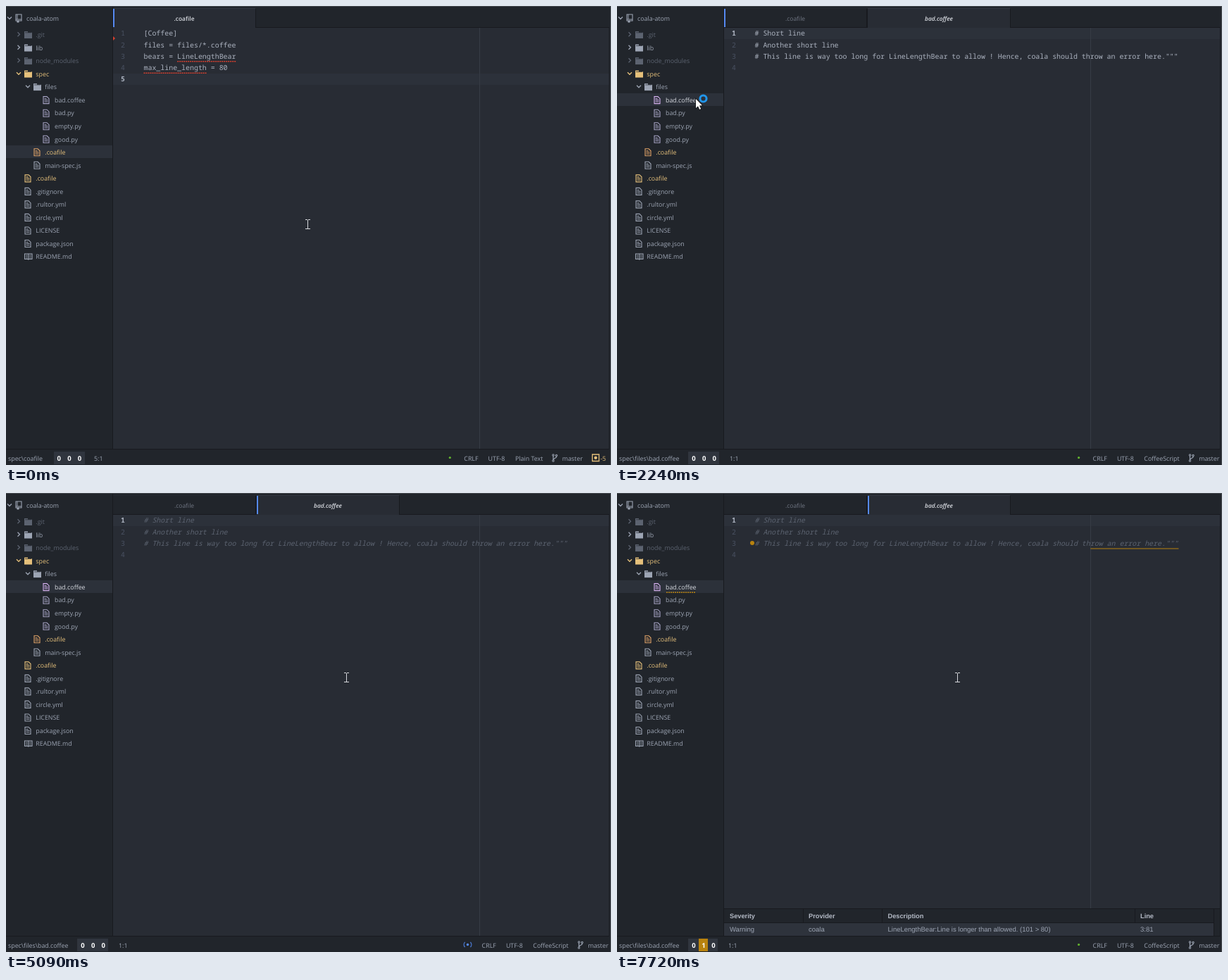
These frames come from a looping animation (859 by 652 pixels, 8000 ms). An HTML page with a canvas:

```html
<!DOCTYPE html>
<html lang="en">
<head>
<meta charset="utf-8">
<title>Editor linting a file</title>
<style>
  html, body { margin: 0; width: 100%; height: 100%; overflow: hidden; background: #282c34; }
  canvas { display: block; }
</style>
</head>
<body>
<canvas id="stage" width="859" height="652"></canvas>
<script>
const ctx = document.getElementById('stage').getContext('2d');
ctx.textRendering = 'geometricPrecision';

const LOOP = 8000;
const T = { select: 1890, busy: 1945, open: 2240, focus: 2330, grammar: 2420, spin: 2540, result: 7620, done: 7700 };
const C = {
  side: '#21252b', editor: '#282c34', line: '#2c313a', border: '#181a1f', edge: '#484c52',
  text: '#9da5b4', code: '#abb2bf', dim: '#5c6370', faint: '#495162', bright: '#d7dae0',
  yellow: '#e5c07b', orange: '#e0a368', violet: '#a6a3c4', pink: '#d5b0ee',
  blue: '#568af2', red: '#d8402f', warn: '#b8820e', green: '#65b82e'
};
const UI = '8.85px "Open Sans", sans-serif';
const MONO = '9.933px "Noto Sans Mono", monospace';
const COL = 5.96, CODE_X = 195.5;

const TREE = [
  // name, level, kind, colour
  ['.git', 0, 'closed', C.dim],
  ['lib', 0, 'closed', C.text],
  ['node_modules', 0, 'closed', C.dim],
  ['spec', 0, 'opened', C.yellow],
  ['files', 1, 'opened', C.text],
  ['bad.coffee', 2, 'file', C.text, C.violet],
  ['bad.py', 2, 'file', C.text, C.violet],
  ['empty.py', 2, 'file', C.text, C.violet],
  ['good.py', 2, 'file', C.text, C.violet],
  ['.coafile', 1, 'file', C.yellow, C.orange],
  ['main-spec.js', 1, 'file', C.text],
  ['.coafile', 0, 'file', C.yellow],
  ['.gitignore', 0, 'file', C.text],
  ['.rultor.yml', 0, 'file', C.text],
  ['circle.yml', 0, 'file', C.text],
  ['LICENSE', 0, 'file', C.text],
  ['package.json', 0, 'file', C.text],
  ['README.md', 0, 'book', C.text]
];
const CONFIG = ['[Coffee]', 'files = files/*.coffee', 'bears = LineLengthBear', 'max_line_length = 80', ''];
const COFFEE = ['# Short line', '# Another short line',
  '# This line is way too long for LineLengthBear to allow ! Hence, coala should throw an error here."""', ''];

// Mouse path: time, x, y
const PATH = [
  [0, 428, 310], [559, 428, 310], [560, 378, 281], [730, 206, 178], [979, 206, 178],
  [980, 190, 172], [1460, 122, 140], [1670, 112, 132], [2540, 112, 132],
  [2760, 300, 216], [2970, 483, 262], [LOOP, 483, 262]
];

function rect(x, y, w, h, color) {
  ctx.fillStyle = color;
  ctx.fillRect(x, y, w, h);
}

function text(s, x, y, color = C.text, font = UI, align = 'left') {
  ctx.font = font;
  ctx.fillStyle = color;
  ctx.textAlign = align;
  ctx.fillText(s, x, y + 3.3);
}

function poly(points, color, width = 1, close = false) {
  ctx.beginPath();
  points.forEach(([x, y]) => ctx.lineTo(x, y));
  if (close) ctx.closePath();
  ctx.strokeStyle = color;
  ctx.lineWidth = width;
  ctx.stroke();
}

function disc(x, y, r, color) {
  ctx.beginPath();
  ctx.arc(x, y, r, 0, 7);
  ctx.fillStyle = color;
  ctx.fill();
}

function arc(x, y, r, from, to, color, width) {
  ctx.beginPath();
  ctx.arc(x, y, r, from, to);
  ctx.strokeStyle = color;
  ctx.lineWidth = width;
  ctx.stroke();
}

function dots(x0, x1, y, color) {
  for (let x = x0; x < x1; x += 3) rect(x, y, 2, 1.5, color);
}

function chevron(x, y, open, color) {
  poly(open ? [[x - 3, y - 1.5], [x, y + 1.5], [x + 3, y - 1.5]]
            : [[x - 1.5, y - 3], [x + 1.5, y], [x - 1.5, y + 3]], color, 1.3);
}

function folder(x, y, color) {
  rect(x, y - 5, 5, 2, color);
  rect(x, y - 3.3, 11, 8.3, color);
  rect(x + 1, y - 3.5, 9, 0.7, C.side);
}

function fileIcon(x, y, color) {
  poly([[x + .5, y - 5], [x + 5.5, y - 5], [x + 8.5, y - 2], [x + 8.5, y + 5], [x + .5, y + 5]], color, 1.1, true);
  rect(x + 2, y - 2.5, 3, 1, color);
  rect(x + 2, y - .5, 5, 1, color);
  rect(x + 2, y + 1.8, 5, 1, color);
}

function bookIcon(x, y, color) {
  poly([[x + .5, y - 4], [x + 11, y - 4], [x + 11, y + 3.5], [x + .5, y + 3.5]], color, 1.1, true);
  poly([[x + 5.75, y - 4], [x + 5.75, y + 4.8]], color, 1.1);
  for (const dy of [-2, 0, 2]) {
    rect(x + 2, y + dy - .4, 2.4, .8, color);
    rect(x + 7.1, y + dy - .4, 2.4, .8, color);
  }
}

function repoIcon(x, y) {
  poly([[x + 1, y - 5], [x + 9, y - 5], [x + 9, y + 4], [x + 1, y + 4]], C.text, 1.1, true);
  poly([[x + 3, y - 5], [x + 3, y + 2]], C.text);
  poly([[x + 1, y + 2], [x + 9, y + 2]], C.text);
  rect(x + 2.5, y + 3.5, 3, 3, C.text);
}

function branchIcon(x, y) {
  poly([[x + 2, y - 4], [x + 2, y + 4]], C.text, 1.2);
  poly([[x + 6.5, y - 3], [x + 6.5, y - 1], [x + 2, y + 2]], C.text, 1.2);
  for (const [dx, dy] of [[2, -4], [6.5, -3.5], [2, 4]]) {
    disc(x + dx, y + dy, 1.7, C.text);
    disc(x + dx, y + dy, .7, C.side);
  }
}

function drawTree(t) {
  rect(0, 0, 151, 629, C.side);
  chevron(5, 17, true, C.text);
  repoIcon(13, 17);
  text('coala-atom', 29, 17.5);
  const selected = t < T.select ? 9 : 5;
  TREE.forEach(([name, level, kind, color, tint], i) => {
    const y = 41 + i * 18.53, x = 26 + level * 13, on = i === selected;
    if (on) rect(0, Math.round(y - 9.3), 151, 18, C.line);
    const label = on && color === C.text ? C.bright : color;
    let icon = tint || color;
    if (on && i === 5) icon = C.pink;
    if (kind === 'file') fileIcon(x + .5, y, icon);
    else if (kind === 'book') bookIcon(x, y, icon);
    else {
      chevron(x - 8, y - .8, kind === 'opened', color);
      folder(x, y, color);
    }
    text(name, x + (level === 2 ? 17 : 16.3), y, label);
  });
  if (t >= T.result) dots(70, 112, 140.5, C.warn);
  rect(151, 0, 1, 629, C.border);
}

function tab(x, w, name, active, italic) {
  rect(x, 4, w, active ? 27 : 26, active ? C.editor : C.side);
  rect(x, 3, w, 1, active ? '#343841' : '#252930');
  rect(x + w, 4, 1, 26, C.border);
  const style = (italic ? 'italic ' : '') + (active ? '600 8.4px' : '8.5px');
  text(name, x + w / 2, 17.5, active ? C.bright : '#717784', style + ' "Open Sans", sans-serif', 'center');
}

function drawTabs(t) {
  rect(152, 0, 707, 30, C.side);
  rect(152, 30, 705, 1, C.border);
  const opened = t >= T.open;
  tab(152, 202, '.coafile', !opened, false);
  if (opened) tab(356, 202, 'bad.coffee', true, true);
  rect(355, 4, opened ? 1 : 0, 26, C.border);
  rect(t < T.focus ? 152 : 356, 4, 2, 26, C.blue);
}

function drawEditor(t) {
  rect(152, 30, 705, 600, C.editor);
  const opened = t >= T.open, comments = t >= T.grammar;
  const lines = opened ? COFFEE : CONFIG, current = opened ? 0 : 4;
  rect(152, opened ? 31 : 96, 704, 16, C.line);
  rect(672, 31, 1, 599, '#373c45');
  lines.forEach((s, i) => {
    const y = 39 + i * 16.25, on = i === current;
    text(i + 1, 169, y, on ? C.code : C.faint, (on ? '600 ' : '') + MONO, 'right');
    text(s, CODE_X, y, opened && comments ? C.dim : C.code, (opened && comments ? 'italic ' : '') + MONO);
  });
  if (!opened) {
    dots(CODE_X + 8 * COL, CODE_X + 22 * COL, 78, C.red);
    dots(CODE_X, CODE_X + 15 * COL, 94.5, C.red);
    ctx.fillStyle = C.red;
    ctx.beginPath();
    ctx.moveTo(152, 43);
    ctx.lineTo(155, 46);
    ctx.lineTo(152, 49);
    ctx.fill();
  }
  if (t >= T.result) {
    rect(CODE_X + 80 * COL, 78.5, 21 * COL, 1, C.warn);
    disc(192, 71, 3, C.warn);
  }
}

function drawPanel() {
  rect(152, 590, 705, 40, C.side);
  rect(152, 590, 705, 1, C.border);
  rect(152, 611, 695, 18, '#2e333c');
  rect(152, 610, 695, 1, C.border);
  for (const x of [264, 376, 735, 847]) rect(x, 591, 1, x === 847 ? 38 : 19, C.border);
  const cells = [[160, 'Severity', 'Warning'], [272, 'Provider', 'coala'],
    [384.5, 'Description', 'LineLengthBear:Line is longer than allowed. (101 > 80)'], [743, 'Line', '3:81']];
  for (const [x, head, value] of cells) {
    text(head, x, 601, '#b4bac6', 'bold 9.25px "Liberation Sans", sans-serif');
    text(value, x, 619.5, C.text, '9.5px "Liberation Sans", sans-serif');
  }
}

function spinner(x, y, t) {
  const a = (t - 2990) / 1050 * Math.PI * 2;
  for (const side of [0, Math.PI]) arc(x, y, 5.3, a + side - .75, a + side + .75, '#4a78cf', 1.4);
  disc(x, y, 1.7, C.blue);
}

function drawStatus(t) {
  const opened = t >= T.open, found = t >= T.result, y = 642.5;
  rect(0, 629, 857, 1, C.border);
  rect(0, 630, 859, 22, C.side);
  text(opened ? 'spec\\files\\bad.coffee' : 'spec\\coafile', 3, y);
  const left = opened ? 101 : 68;
  rect(left, 633, found ? 42 : 44, 18, '#30353e');
  if (found) rect(116, 633, 13, 18, C.warn);
  const step = found ? 14 : 14.6;
  for (let i = 0; i < 3; i++) {
    text(found && i === 1 ? 1 : 0, left + (opened ? 8 : 7.3) + i * step, y, '#ffffff', 'bold 9.5px "Open Sans", sans-serif', 'center');
  }
  text(opened ? '1:1' : '5:1', found ? 158 : opened ? 160 : 125, y);

  const shift = opened ? 25.3 : 0;
  if (t >= T.spin && t < T.done) spinner(655.5, 641.5, t);
  else disc(630.3 + shift, 641.5, 1.6, C.green);
  text('CRLF', 650.3 + shift, y);
  text('UTF-8', 684.6 + shift, y);
  text(opened ? 'CoffeeScript' : 'Plain Text', 723 + shift, y);
  const end = opened ? 36.5 : 0;
  branchIcon(775 + end, 642);
  text('master', 789.7 + end, y);
  if (!opened) {
    poly([[832.5, 637], [842, 637], [842, 646.5], [832.5, 646.5]], C.yellow, 1.3, true);
    disc(837.2, 641.8, 2.2, C.yellow);
    text('-5', 844, y, C.yellow);
  }
}

function mouseAt(t) {
  const i = PATH.findIndex(p => p[0] > t);
  const [t0, x0, y0] = PATH[i - 1], [t1, x1, y1] = PATH[i];
  const k = (t - t0) / (t1 - t0);
  return [Math.round(x0 + (x1 - x0) * k), Math.round(y0 + (y1 - y0) * k)];
}

function drawMouse(t) {
  const [x, y] = mouseAt(t);
  if (t < 980 || x > 152 && t > T.open) {
    const c = '#d6d8dc';
    rect(x, y - 6, 1, 13, c);
    for (const dy of [-7, 6]) {
      rect(x - 3, y + dy, 3, 1, c);
      rect(x + 1, y + dy, 3, 1, c);
    }
    return;
  }
  ctx.beginPath();
  for (const [dx, dy] of [[0, 0], [0, 13], [3, 10.3], [5.2, 15], [7.2, 14], [5, 9.5], [9, 9.2]]) ctx.lineTo(x + dx, y + dy);
  ctx.closePath();
  ctx.strokeStyle = '#101114';
  ctx.lineWidth = 1.4;
  ctx.stroke();
  ctx.fillStyle = '#ffffff';
  ctx.fill();
  if (t >= T.busy && t < 2540) arc(x + 10.5, y - .5, 4.6, 0, 7, '#2196ea', 3);
}

function draw(t) {
  drawEditor(t);
  drawTabs(t);
  drawTree(t);
  if (t >= T.result) drawPanel();
  drawStatus(t);
  rect(856, 31, 1, 598, C.border);
  rect(0, 0, 859, 1, C.edge);
  rect(858, 0, 1, 652, C.edge);
  drawMouse(t);
}

const start = performance.now();
function frame() {
  draw((performance.now() - start) % LOOP);
  requestAnimationFrame(frame);
}
frame();
</script>
</body>
</html>
```
